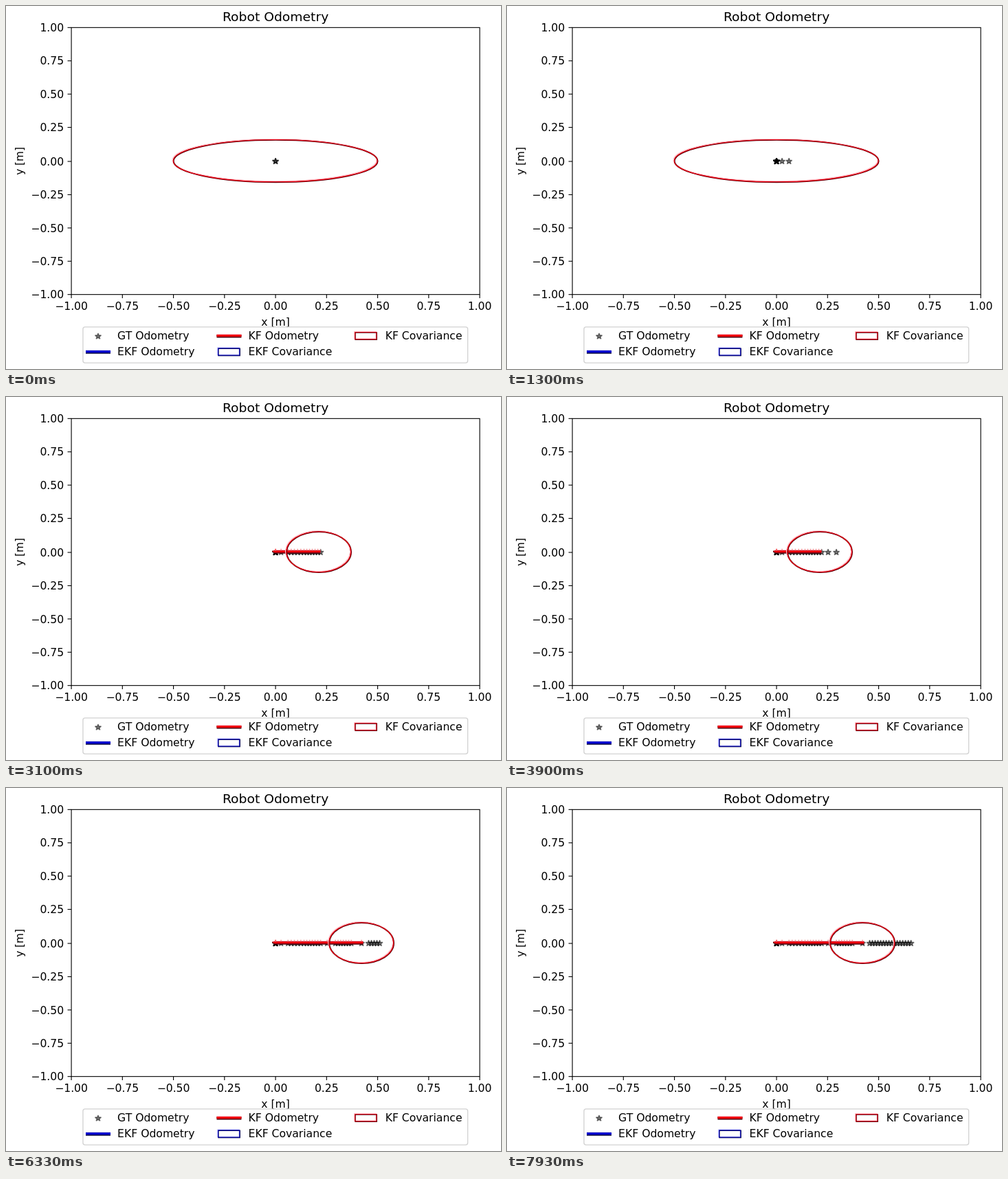
An HTML page with a canvas for the animation above (8 s loop, 720 by 528 pixels).

```html
<!DOCTYPE html>
<html lang="en">
<head>
<meta charset="utf-8">
<title>Robot Odometry</title>
<style>
html, body { margin: 0; width: 100%; height: 100%; overflow: hidden; background: #fff; }
canvas { display: block; }
</style>
</head>
<body>
<canvas id="plot" width="720" height="528"></canvas>
<script>
const ctx = document.getElementById('plot').getContext('2d');
const LOOP = 8000;

// The figure is laid out at 640 x 480 and fills the stage
const W = 640, H = 480;
ctx.scale(720 / W, 528 / H);
const LEFT = 84.5, RIGHT = 612.5, TOP = 28.5, BOTTOM = 381.5;
const CX = (LEFT + RIGHT) / 2, CY = (TOP + BOTTOM) / 2;
const UNIT_X = (RIGHT - LEFT) / 2, UNIT_Y = (BOTTOM - TOP) / 2;
const FONT = 13.89, LINE = 4.17;

const RED = { main: '#f00010', dark: '#50000c', pale: '#ffc8d0' };
const BLUE = { main: '#0000d8', dark: '#08083c', pale: '#d4d4ff' };

// Runs of ground-truth samples: first time, interval, first x, x step, count
const runs = [
  [-150, 150, 0, 0, 8],
  [930, 360, 0.027, 0, 1],
  [1290, 161, 0.061, 0.0157, 6],
  [2260, 153, 0.153, 0.0135, 6],
  [3470, 380, 0.2525, 0, 1],
  [3850, 146, 0.293, 0.013, 7],
  [5270, 450, 0.421, 0, 1],
  [5720, 147, 0.456, 0.0135, 16]
];
const samples = runs.flatMap(([t, dt, x, dx, n]) =>
  Array.from({ length: n }, (_, i) => ({ t: t + i * dt, x: CX + UNIT_X * (x + i * dx) })));

// Filter estimates: time, centre and radii of the covariance
const estimates = [
  { t: 0, x: 0, rx: 0.5, ry: 0.158 },
  { t: 3020, x: 0.212, rx: 0.158, ry: 0.152 },
  { t: 5270, x: 0.421, rx: 0.158, ry: 0.152 }
];

function text(str, x, y, align = 'left', size = FONT) {
  ctx.font = `${size}px "DejaVu Sans", sans-serif`;
  ctx.textAlign = align;
  ctx.fillStyle = '#000';
  ctx.fillText(str, x, y);
}

function line(x1, y1, x2, y2) {
  ctx.beginPath();
  ctx.moveTo(x1, y1);
  ctx.lineTo(x2, y2);
  ctx.stroke();
}

function star(x, y) {
  ctx.beginPath();
  for (let i = 0; i < 10; i++) {
    const r = i % 2 ? 1.6 : 4.17;
    const a = i * Math.PI / 5 - Math.PI / 2;
    ctx.lineTo(x + r * Math.cos(a), y + r * Math.sin(a));
  }
  ctx.closePath();
  ctx.fillStyle = ctx.strokeStyle = 'rgba(0,0,0,.5)';
  ctx.lineWidth = 1.39;
  ctx.lineJoin = 'bevel';
  ctx.fill();
  ctx.stroke();
}

// Outline whose colour sits slightly up and left of its dark edge
function tintedOutline(color, width, addPath) {
  const layers = [[color.pale, -1.1, width], [color.dark, 0.1, width], [color.main, -0.3, width * 0.6]];
  ctx.lineJoin = 'miter';
  for (const [style, shift, lineWidth] of layers) {
    ctx.save();
    ctx.translate(shift, shift);
    ctx.beginPath();
    addPath();
    ctx.strokeStyle = style;
    ctx.lineWidth = lineWidth;
    ctx.stroke();
    ctx.restore();
  }
}

function tintedLine(color, x1, x2, y) {
  const layers = [[color.pale, -1, LINE], [color.dark, 0, LINE], [color.main, -0.7, LINE - 1.4]];
  for (const [style, dy, width] of layers) {
    ctx.strokeStyle = style;
    ctx.lineWidth = width;
    line(x1 - LINE / 2, y + dy, x2 + LINE / 2, y + dy);
  }
}

function drawTrack(x) {
  // Redden the star tips that stand above the line
  ctx.globalCompositeOperation = 'lighten';
  ctx.fillStyle = RED.main;
  ctx.fillRect(CX - 4, CY - 5, x - CX + 6, 5);
  ctx.globalCompositeOperation = 'source-over';
  tintedLine(RED, CX, x, CY);
}

function drawAxes() {
  ctx.strokeStyle = '#000';
  ctx.lineWidth = 1;
  ctx.strokeRect(LEFT, TOP, RIGHT - LEFT, BOTTOM - TOP);
  for (let i = 0; i <= 8; i++) {
    const value = i / 4 - 1;
    const label = (value < 0 ? '\u2212' : '') + Math.abs(value).toFixed(2);
    const x = CX + UNIT_X * value;
    const y = Math.floor(CY - UNIT_Y * value) + 0.5;
    line(x, BOTTOM, x, BOTTOM + 4.9);
    line(LEFT - 4.9, y, LEFT, y);
    text(label, x, 402, 'center');
    text(label, LEFT - 9.7, y + 5.2, 'right');
  }
  text('Robot Odometry', CX, 20, 'center', FONT * 1.2);
  text('x [m]', CX, 422.5, 'center');
  ctx.save();
  ctx.translate(22, CY);
  ctx.rotate(-Math.PI / 2);
  text('y [m]', 0, 0, 'center');
  ctx.restore();
}

function drawLegend() {
  const columns = [105.2, 274.5, 451.5], rows = [441, 462.2];
  const handle = 2 * FONT, boxHeight = 0.7 * FONT;
  const label = (str, col, row) => text(str, columns[col] + 2.8 * FONT, rows[row]);
  const swatch = (color, col, row) => tintedOutline(color, 1.25, () =>
    ctx.rect(columns[col], rows[row] - boxHeight + 0.4, handle, boxHeight - 0.4));
  const stroke = (color, col, row) =>
    tintedLine(color, columns[col], columns[col] + handle, rows[row] - 4.4);

  ctx.beginPath();
  ctx.roundRect(99.5, 424.5, 497.5, 47.5, 2.8);
  ctx.fillStyle = '#fff';
  ctx.fill();
  ctx.strokeStyle = '#d2d2d2';
  ctx.lineWidth = 1.2;
  ctx.stroke();

  star(columns[0] + handle / 2, rows[0] - 4.2);
  label('GT Odometry', 0, 0);
  stroke(BLUE, 0, 1);
  label('EKF Odometry', 0, 1);
  stroke(RED, 1, 0);
  label('KF Odometry', 1, 0);
  swatch(BLUE, 1, 1);
  label('EKF Covariance', 1, 1);
  swatch(RED, 2, 0);
  label('KF Covariance', 2, 0);
}

function draw(t) {
  ctx.fillStyle = '#fff';
  ctx.fillRect(0, 0, W, H);
  for (const s of samples) if (s.t <= t) star(s.x, CY + 0.4);
  const { x, rx, ry } = estimates.findLast(e => e.t <= t);
  const centre = CX + UNIT_X * x;
  if (x > 0) drawTrack(centre);
  tintedOutline(RED, 1.6, () =>
    ctx.ellipse(centre, CY, UNIT_X * rx, UNIT_Y * ry, 0, 0, 2 * Math.PI));
  drawAxes();
  drawLegend();
}

const start = performance.now();
function tick() {
  draw((performance.now() - start) % LOOP);
  requestAnimationFrame(tick);
}
tick();
</script>
</body>
</html>
```
